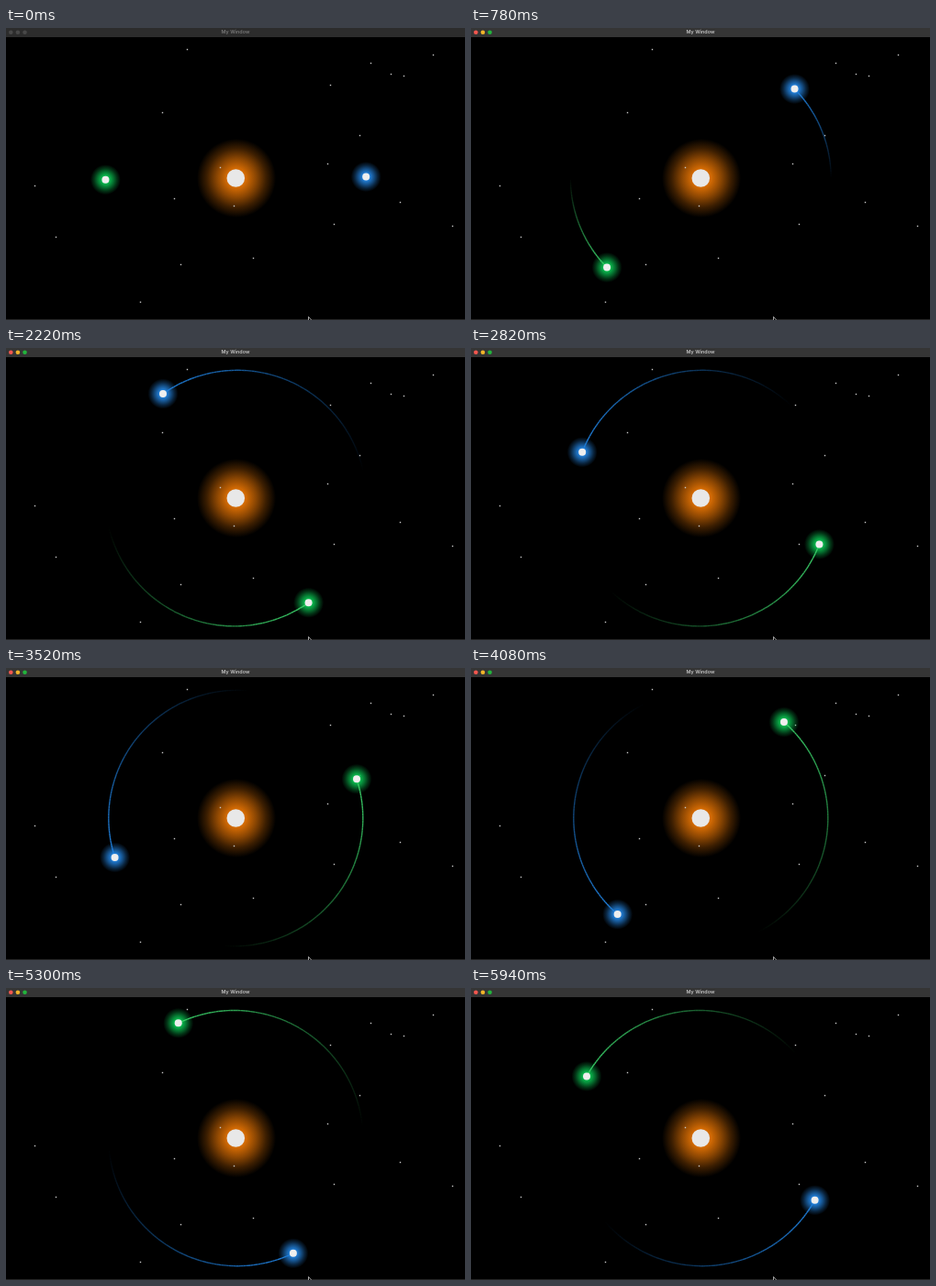
Animation, 500 px wide and 319 px high, one loop 5960 ms. Source, as an HTML page with a canvas:

```html
<!DOCTYPE html>
<html lang="en">
<head>
<meta charset="utf-8">
<style>
  html, body { margin: 0; width: 100%; height: 100%; overflow: hidden; background: #000; }
  canvas { display: block; }
  #title {
    position: absolute; left: 0; top: 0; width: 500px; height: 10px;
    font: 600 5.4px/9.4px Inter, sans-serif; text-align: center;
  }
</style>
</head>
<body>
<canvas id="stage" width="500" height="319"></canvas>
<div id="title">My Window</div>
<script>
const ctx = document.getElementById('stage').getContext('2d');
const title = document.getElementById('title');
const LOOP = 5960, STEP = 20, TRAIL = 2000;
const RAD = Math.PI / 180;
const BLUE = '36,134,228', GREEN = '10,196,82', ORANGE = '222,112,4';
const stars = [
  [197, 23], [465, 29], [397, 38], [419, 50], [433, 52], [353, 62], [170, 92],
  [385, 117], [350, 148], [233, 152], [31, 172], [183, 186], [248, 194],
  [429, 190], [357, 214], [486, 216], [54, 228], [269, 251], [190, 258], [146, 299]
];

// Slightly eccentric orbit, a little faster on the far side
function bluePos(t) {
  const mean = 0.6 + 0.0556 * t;
  const a = (mean + 0.8 * (1 - Math.cos(mean * RAD))) * RAD;
  return [252 + 140.2 * Math.cos(a), 164 - 139.7 * Math.sin(a)];
}

// The second planet sits opposite the first
function greenPos(t) {
  const [x, y] = bluePos(t);
  return [500.6 - x, 328.2 - y];
}

function disc(x, y, r, fill) {
  ctx.fillStyle = fill;
  ctx.beginPath();
  ctx.arc(x, y, r, 0, 7);
  ctx.fill();
}

function glow(x, y, r, rgb) {
  const g = ctx.createRadialGradient(x, y, 0, x, y, r);
  [[0, 1], [0.25, 0.94], [0.5, 0.62], [0.75, 0.27], [1, 0]]
    .forEach(([at, alpha]) => g.addColorStop(at, `rgba(${rgb},${alpha})`));
  disc(x, y, r, g);
}

function trail(pos, t, rgb) {
  const span = Math.min(t, TRAIL);
  const n = Math.ceil(span / STEP);
  ctx.lineWidth = 1.4;
  for (let i = 0; i < n; i++) {
    const from = t - span + span * i / n;
    ctx.strokeStyle = `rgba(${rgb},${(i + 1) / n})`;
    ctx.beginPath();
    ctx.moveTo(...pos(from));
    ctx.lineTo(...pos(from + span / n));
    ctx.stroke();
  }
}

function planet(pos, t, rgb, lineRgb) {
  const [x, y] = pos(t);
  glow(x, y, 16.5, rgb);
  trail(pos, t, lineRgb);
  disc(x, y, 4, '#eee');
}

function titleBar(active) {
  ctx.fillStyle = active ? '#353535' : '#2c2c2c';
  ctx.fillRect(0, 0, 500, 10);
  const lights = active ? ['#f4574f', '#f0b429', '#22b53c'] : ['#484848', '#484848', '#484848'];
  lights.forEach((c, i) => disc(5.3 + 7.6 * i, 4.7, 2.3, c));
  title.style.color = active ? '#c4c4c4' : '#777';
}

function cursor() {
  ctx.beginPath();
  ctx.moveTo(329.5, 320);
  ctx.lineTo(329.5, 315.5);
  ctx.lineTo(333, 319.5);
  ctx.fillStyle = '#000';
  ctx.fill();
  ctx.strokeStyle = '#ccc';
  ctx.lineWidth = 0.8;
  ctx.stroke();
}

function draw(t) {
  ctx.fillStyle = '#000';
  ctx.fillRect(0, 0, 500, 319);
  glow(251, 164, 43, ORANGE);
  ctx.fillStyle = '#c8c8c8';
  stars.forEach(([x, y]) => ctx.fillRect(x - 0.2, y - 0.2, 1.4, 1.4));
  disc(250.3, 164, 9.8, '#e8e8e8');
  planet(bluePos, t, BLUE, '32,128,220');
  planet(greenPos, t, GREEN, '58,206,104');
  ctx.fillStyle = '#222';
  ctx.fillRect(0, 318, 500, 1);
  cursor();
  titleBar(t >= STEP);
}

const start = performance.now();
function tick() {
  const t = (performance.now() - start) % LOOP;
  draw(Math.floor(t / STEP) * STEP);
  requestAnimationFrame(tick);
}
tick();
</script>
</body>
</html>
```
